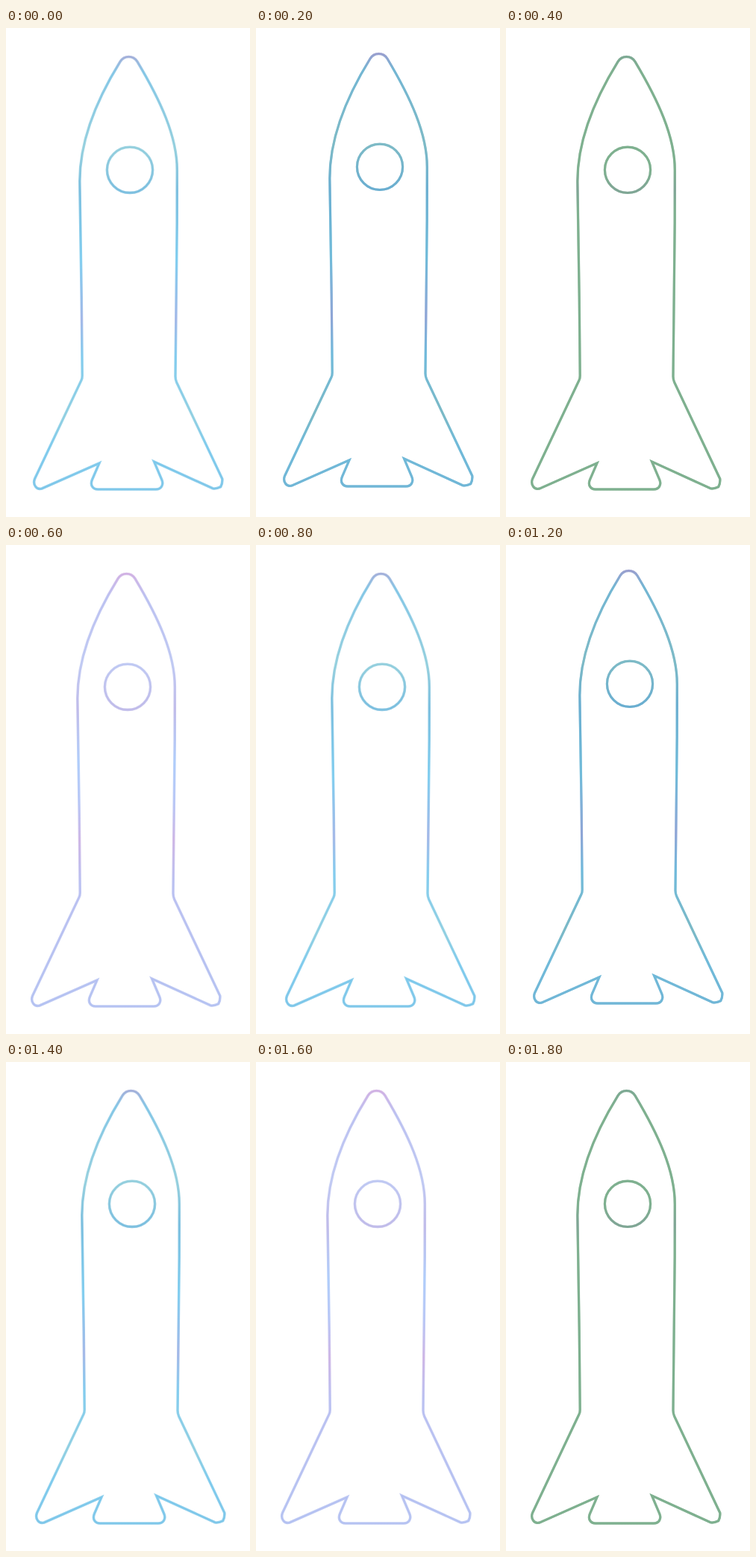
Recreate the animation shown at these times as an HTML page. Size 327x654 px, loop 2000 ms.

```html
<!DOCTYPE html>
<html lang="en">
<head>
<meta charset="utf-8">
<title>Shaking rocket</title>
<style>
  html, body { margin: 0; width: 100%; height: 100%; overflow: hidden; background: #fff; }
  svg { display: block; width: 327px; height: 654px; }
</style>
</head>
<body>
<svg viewBox="0 0 327 654">
  <defs>
    <g id="shape">
      <path d="M98.8 205 C98.8 150 122 95 153 45 Q157 38.5 164.5 38.5 Q172 38.5 176 45
        C207 97 229.3 145 229.3 190 L229.2 260 L227 466 Q227 470 228.7 474 L289.8 603
        Q290.3 609 287.7 613.7 Q282 616.7 277 615.7 L198.5 580 L208.7 604
        C211.7 611 208 617 201 617 H123 C116 617 112.5 611 115.5 604 L125 582
        L48 616 C41 618 35.5 611 38.5 603 L101 471 Q102.2 469 102.2 465 L101.2 360 Z"/>
      <circle cx="166" cy="189.8" r="30.6"/>
    </g>
  </defs>
  <g id="rocket" fill="none" stroke-linejoin="miter">
    <use id="halo" href="#shape"/>
    <use id="core" href="#shape"/>
  </g>
</svg>
<script>
const $ = id => document.getElementById(id);
const NS = 'http://www.w3.org/2000/svg';

// Line looks: vertical gradient stops as [y, colour], stroke widths, halo opacity
const looks = {
  sky: {
    stops: [[38, '#a0acd8'], [60, '#7cc3e4'], [160, '#8fcddc'], [218, '#74bbdd'], [310, '#78caee'],
            [390, '#9db3e6'], [440, '#7bc9ed'], [520, '#8bcde0'], [560, '#78c8ec'], [617, '#78c4e8']],
    halo: 3.6, core: 1.4, opacity: 0.8
  },
  teal: {
    stops: [[38, '#9a9fcf'], [60, '#73b6d3'], [160, '#7dbac6'], [218, '#6aaed0'], [310, '#70bbd9'],
            [390, '#8fa5d6'], [440, '#70badb'], [520, '#7bb9c6'], [560, '#70bad9'], [617, '#70b6d6']],
    halo: 3.3, core: 3, opacity: 0.6
  },
  lavender: {
    stops: [[38, '#cfaee2'], [70, '#b7bdf0'], [160, '#bcc6f2'], [220, '#bcb7e8'], [290, '#abcafa'],
            [345, '#b4c3f5'], [395, '#cbb2e4'], [450, '#b7bdf0'], [617, '#b1bff1']],
    halo: 3.6, core: 1.4, opacity: 0.8
  },
  green: {
    stops: [[38, '#7da993'], [60, '#7eb08f'], [190, '#7eb08f'], [217, '#7fa595'], [245, '#7eb08f'], [617, '#7eb08f']],
    halo: 3.4, core: 3, opacity: 0.6
  }
};

// Start time, x and y offset, look
const steps = [
  [0, 0, 0, 'sky'],
  [100, 3, 0, 'sky'],
  [200, 0, -4, 'teal'],
  [400, -3, 0, 'green'],
  [500, 0, 4, 'teal'],
  [600, -3, 0, 'lavender'],
  [800, 3, 0, 'sky'],
  [900, 0, 0, 'sky'],
  [1000, -3, 0, 'lavender'],
  [1200, 0, -4, 'teal'],
  [1300, 0, 4, 'teal'],
  [1400, 3, 0, 'sky'],
  [1600, -3, 0, 'lavender'],
  [1700, 0, 4, 'teal'],
  [1800, -3, 0, 'green']
];
const LOOP = 2000;

function make(tag, attrs, parent) {
  const el = document.createElementNS(NS, tag);
  for (const key in attrs) el.setAttribute(key, attrs[key]);
  return parent.appendChild(el);
}

for (const name in looks) {
  const grad = make('linearGradient',
    { id: name, gradientUnits: 'userSpaceOnUse', x1: 0, y1: 0, x2: 0, y2: 654 },
    document.querySelector('defs'));
  for (const [y, color] of looks[name].stops)
    make('stop', { offset: y / 654, 'stop-color': color }, grad);
}

function line(id, name, opacity) {
  const el = $(id);
  el.setAttribute('stroke', `url(#${name})`);
  el.setAttribute('stroke-width', looks[name][id]);
  el.setAttribute('stroke-opacity', opacity);
}

let shown;
const start = performance.now();

function draw() {
  const time = (performance.now() - start) % LOOP;
  const step = steps.filter(s => s[0] <= time).pop();
  if (step !== shown) {
    shown = step;
    const [, x, y, name] = step;
    $('rocket').setAttribute('transform', `translate(${x} ${y})`);
    line('halo', name, looks[name].opacity);
    line('core', name, 1);
  }
  requestAnimationFrame(draw);
}
draw();
</script>
</body>
</html>
```
